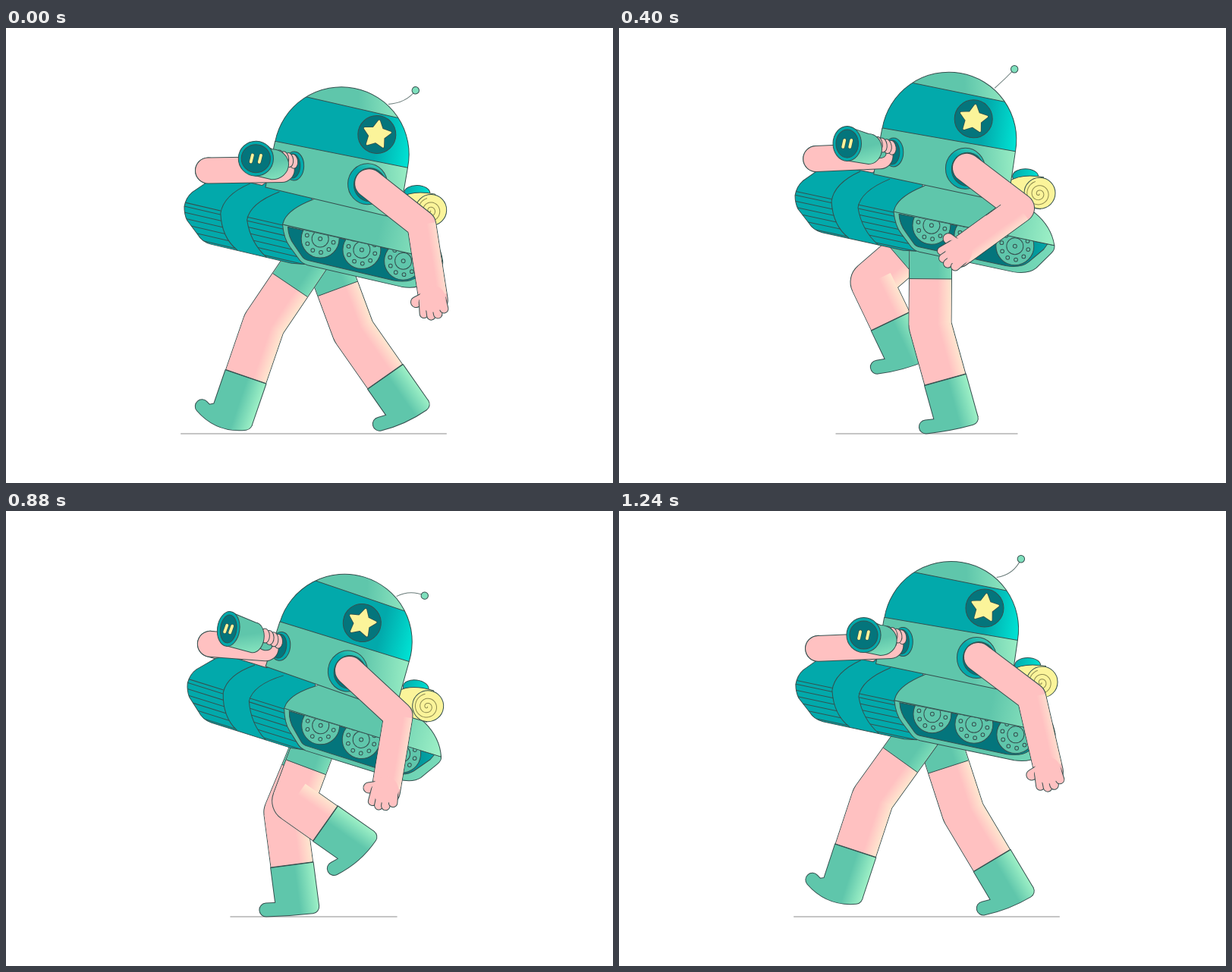
Recreate the animation shown at these times as an HTML page with a canvas. Size 800 px wide and 600 px high, loop 1280 ms.

```html
<!DOCTYPE html>
<html lang="en">
<head>
<meta charset="utf-8">
<title>Walking tank</title>
<style>
html, body { margin: 0; width: 100%; height: 100%; overflow: hidden; background: #fff; }
canvas { display: block; width: 800px; height: 600px; }
</style>
</head>
<body>
<canvas id="stage" width="800" height="600"></canvas>
<script>
const ctx = document.getElementById('stage').getContext('2d');
const LOOP = 1280, STEP = LOOP / 2, TICK = 40, FLOOR = 535;
const INK = '#35504f', PINK = '#ffc1c1', CREAM = '#ffe6cf', GREEN = '#5fc6ab', MINT = '#9df0c6',
  TEAL = '#02a9ab', CYAN = '#00e0d2', DEEP = '#04757c', YELLOW = '#fbf49a';

// Key poses of one leg: time, knee, boot top.
const POSES = [
  { t: 0, knee: [340, 390], top: [316, 460] },
  { t: 160, knee: [350, 399], top: [352, 467] },
  { t: 400, knee: [410, 392], top: [430, 464] },
  { t: 640, knee: [458, 400], top: [500, 460] },
  { t: 720, knee: [432, 413], top: [485, 452] },
  { t: 800, knee: [405, 408], top: [454, 431] },
  { t: 1040, knee: [333, 335], top: [358, 387] },
  { t: 1200, knee: [330, 366], top: [314, 433] }
];

const rad = deg => deg * Math.PI / 180;
const wave = (t, period, peak) => Math.cos(2 * Math.PI * (t - peak) / period);
const add = (p, d, k) => [p[0] + d[0] * k, p[1] + d[1] * k];
const mix = (a, b, k) => [a[0] + (b[0] - a[0]) * k, a[1] + (b[1] - a[1]) * k];
const aim = deg => [Math.cos(rad(deg)), Math.sin(rad(deg))];
const back = d => [d[1], -d[0]];
const unit = (a, b) => {
  const x = b[0] - a[0], y = b[1] - a[1], l = Math.hypot(x, y);
  return [x / l, y / l];
};

// How deep the body sinks within a step: 0 is upright, 1 is the lowest point.
const sink = t => .38 + .57 * wave(t, STEP, 132) + .14 * wave(t, STEP / 2, 120);

// Smooth periodic path through the key poses.
function pose(part, t) {
  t %= LOOP;
  const n = POSES.length;
  const at = i => {
    const p = POSES[(i + n) % n];
    return [p.t + Math.floor(i / n) * LOOP, p[part]];
  };
  let i = n - 1;
  while (POSES[i].t > t) i--;
  const [ta, a] = at(i - 1), [tb, b] = at(i), [tc, c] = at(i + 1), [td, d] = at(i + 2);
  const h = tc - tb, u = (t - tb) / h, v = 1 - u;
  return b.map((y, j) => {
    const m0 = (c[j] - a[j]) / (tc - ta) * h, m1 = (d[j] - y) / (td - tb) * h;
    return v * v * (1 + 2 * u) * y + u * v * v * m0 + u * u * (3 - 2 * u) * c[j] - u * u * v * m1;
  });
}

function paint(path, fill, line = INK, w = 1) {
  if (fill) { ctx.fillStyle = fill; ctx.fill(path); }
  if (line) { ctx.strokeStyle = line; ctx.lineWidth = w; ctx.stroke(path); }
}
const shape = (d, fill, line, w) => paint(new Path2D(d), fill, line, w);
function oval(x, y, rx, ry, fill, line, turn = 0) {
  const p = new Path2D();
  p.ellipse(x, y, rx, ry, turn, 0, 2 * Math.PI);
  paint(p, fill, line);
}
function trace(pts, w, color, cap = 'butt') {
  ctx.beginPath();
  pts.forEach(p => ctx.lineTo(...p));
  ctx.lineCap = cap;
  ctx.lineWidth = w;
  ctx.strokeStyle = color;
  ctx.stroke();
}
function blend(a, b, ...stops) {
  const g = ctx.createLinearGradient(...a, ...b);
  stops.forEach(([k, c]) => g.addColorStop(k, c));
  return g;
}
// Straight piece of a limb, lit along its back edge.
function lit(a, b, w, base, light) {
  const n = back(unit(a, b));
  trace([a, b], w, blend(add(a, n, -w / 2), add(a, n, w / 2), [.68, base], [1, light]));
}
function limb(pts, w, color) {
  trace(pts, w + 2, INK, 'round');
  trace(pts, w, color, 'round');
}
function placed(px, py, x, y, deg, draw) {
  ctx.save();
  ctx.translate(px + x, py + y);
  ctx.rotate(rad(deg));
  ctx.translate(-px, -py);
  draw();
  ctx.restore();
}

function boot(top, d, t) {
  const n = back(d);
  const front = add(top, n, -28), rear = add(top, n, 28);
  const low = add(rear, d, 58), heel = add(low, n, -8.5), ankle = add(front, d, 47);
  const toe = add(add(top, d, 51 + 8 * wave(t, LOOP, 200)), n, -42);
  toe[1] = Math.min(toe[1], FLOOR - 9);
  const s = unit(toe, heel);
  const bend = add(mix(toe, heel, .5), [-s[1], s[0]], d[0] < 0 ? -50 * d[0] : 10 * d[0]);
  const shaft = new Path2D(), sole = new Path2D();
  shaft.moveTo(...front);
  [rear, low, heel].forEach(p => shaft.lineTo(...p));
  shaft.quadraticCurveTo(...bend, ...toe);
  shaft.lineTo(...ankle);
  shaft.closePath();
  sole.moveTo(...heel);
  sole.quadraticCurveTo(...bend, ...toe);
  const tone = blend(front, rear, [.55, GREEN], [1, MINT]);
  ctx.lineCap = 'round';
  paint(shaft, null, INK, 2);
  paint(sole, null, INK, 19);
  paint(sole, null, tone, 17);
  paint(shaft, tone, null);
  trace([front, rear], 1, INK);
}

function leg(t, hipX, hipY) {
  const knee = pose('knee', t), top = pose('top', t), w = 55;
  const hip = [hipX + .1 * (knee[0] - 390), hipY];
  const hem = mix(knee, hip, .52), side = back(unit(knee, hip));
  trace([hip, knee, top], w + 2, INK);
  trace([hip, knee, top], w, PINK);
  lit(hem, knee, w, PINK, CREAM);
  lit(knee, top, w, PINK, CREAM);
  lit(hip, hem, w, GREEN, '#7bdcb8');
  trace([add(hem, side, -w / 2), add(hem, side, w / 2)], 1, INK);
  boot(top, unit(knee, top), t);
}

const FRONT = 'M232 222Q234 210 242 203L266 186Q276 182 290 183L334 192L345 184L400 200V210L392 295L375 294L268 271Q256 268 250 258L236 240Q232 232 232 222Z';
const TRACK = 'M369 246Q370 260 378 270L388 284Q391 289 398 290L510 314Q530 317 540 309L560 292L565 285Z';

function slats(region) {
  ctx.save();
  ctx.clip(new Path2D(FRONT));
  ctx.clip(new Path2D(region));
  trace([[225, 215], [400, 252]], 1, INK);
  for (let y = 220; y < 265; y += 8) trace([[225, y], [400, y + 37]], 1, INK);
  ctx.restore();
}
function wheel(x, y) {
  oval(x, y, 25, 25, GREEN);
  oval(x, y, 11, 11);
  oval(x, y, 2.5, 2.5);
  for (let a = 14; a < 374; a += 36) {
    const [px, py] = add([x, y], aim(a), 18);
    oval(px, py, 2.4, 2.4);
  }
}
function hull() {
  shape(FRONT, TEAL);
  slats('M200 200L280 225V230Q282 262 303 278L200 300Z');
  slats('M315 232V238Q320 268 342 287L396 300L362 241Z');
  shape('M318 190Q283 206 280 230Q282 262 303 278M357 200Q318 216 315 238Q320 268 342 287');
  shape('M362 243Q364 262 372 272L385 289Q389 294 396 296L520 322Q540 325 550 317L570 297Q575 292 574 287Z',
    blend([480, 290], [575, 310], [0, GREEN], [1, '#79dcba']));
  shape(TRACK, blend([510, 290], [566, 295], [0, DEEP], [1, TEAL]));
  ctx.save();
  ctx.clip(new Path2D(TRACK));
  for (let i = 0; i < 3; i++) wheel(412 + 55 * i, 261 + 13.5 * i);
  ctx.restore();
  shape('M400 210Q371 222 364 237L362 243L574 287Q570 262 548 244L513 222L420 200Z',
    blend([490, 248], [575, 265], [0, GREEN], [1, MINT]));
}

function roll() {
  oval(536, 196, 17, 10, blend([518, 190], [552, 196], [0, TEAL], [1, CYAN]));
  shape('M514 203Q530 192 560 197L556 239L510 232Z', YELLOW);
  oval(555, 218, 20.5, 20.5, YELLOW);
  ctx.beginPath();
  for (let a = 0; a < 17; a += .2) ctx.lineTo(...add([554, 219], [Math.cos(a), Math.sin(a)], a));
  ctx.strokeStyle = '#8d8a50';
  ctx.lineWidth = 1;
  ctx.stroke();
}

// The tip trails behind the bobbing body.
function antenna(t) {
  const x = 528 + 8 * wave(t, STEP, 130), y = 63 + 14 * wave(t, STEP, 175);
  const bx = 514 + 5 * wave(t, STEP, 40), by = 72 + 6 * wave(t, STEP, 20);
  shape(`M495 80Q${bx} ${by} ${x} ${y}`, null, '#687a78');
  oval(x, y, 4.7, 4.7, '#7fe0bd');
}

function star(x, y) {
  oval(x, y, 25, 25, DEEP);
  const p = new Path2D();
  for (let i = 0; i < 10; i++) p.lineTo(...add([x, y], aim(-82 + i * 36), i % 2 ? 9.5 : 18));
  p.closePath();
  paint(p, YELLOW, INK, 4);
  paint(p, YELLOW, YELLOW, 2.4);
}

function dome(turn) {
  const p = new Path2D();
  p.moveTo(336, 194);
  p.lineTo(347, 133);
  p.arc(435, 148, 89, rad(189.5), rad(9.5));
  p.lineTo(513, 231);
  p.closePath();
  paint(p, blend([458, 122], [525, 118], [0, GREEN], [1, MINT]), null);
  ctx.save();
  ctx.clip(p);
  shape('M330 62L540 104L540 166L330 130Z', blend([482, 120], [525, 126], [0, TEAL], [1, CYAN]));
  ctx.restore();
  star(463.5 + turn, 120.5);
  paint(p);
}

// Far forearm, its fingers and the gun it holds.
const FAR_ELBOW = [260, 174], FAR_WIDTH = 33;
function gun(turn) {
  const hand = .9 * turn;
  oval(359 + .8 * turn, 165, 13, 19, TEAL);
  oval(357 + .8 * turn, 165, 10, 16, DEEP);
  limb([FAR_ELBOW, [341 + hand, 170]], FAR_WIDTH, PINK);
  oval(340 + hand, 167, 9, 6, GREEN);
  for (let i = 3; i >= 0; i--) oval(338 + i * 6 + hand, 154 + i * 1.6, 6, 9.5, PINK, INK, -.15);

  const x = 295 + 1.57 * turn, y = 153 + .2 * turn, rx = 17.5 + .32 * turn, vx = 30 - .5 * turn, vy = 7;
  const body = new Path2D();
  body.moveTo(x, y - 22.5);
  body.lineTo(x + vx, y + vy - 20);
  body.ellipse(x + vx, y + vy, rx - 1, 20, 0, -Math.PI / 2, Math.PI / 2);
  body.lineTo(x, y + 22.5);
  body.closePath();
  paint(body, blend([x, y - 20], [x + 14, y + 32], [.55, GREEN], [1, '#85e3be']));
  oval(x, y, rx, 23, TEAL);
  oval(x, y, rx - 4, 18.5, DEEP);
  for (const k of [-1, 1]) {
    const c = x + k * rx * .24;
    const slit = [[c + 1, y - 4.5], [c - 1, y + 4.5]];
    trace(slit, 5, INK, 'round');
    trace(slit, 3.8, YELLOW, 'round');
  }
}

function nearArm(s, upper, fore) {
  const u = aim(upper), f = aim(fore), n = [-f[1], f[0]], w = 37;
  const elbow = add(s, u, 88), wrist = add(elbow, f, 95);
  limb([s, elbow, add(wrist, f, 6)], w, PINK);
  lit(elbow, wrist, w, PINK, '#ffdccd');
  if (fore - upper > 80) {
    const edge = add(elbow, n, w / 2);
    trace([add(edge, f, 18), add(edge, f, 42)], 1, INK);
  }
  const spot = (a, b) => add(add(wrist, f, a), n, b);
  limb([spot(0, 8), spot(5, 23)], 13, PINK);
  for (let b = 15; b > -14; b -= 9) limb([spot(6, b * .9), spot(26 - .03 * (b - 3) ** 2, b)], 10.5, PINK);
  oval(...spot(4, 1), 17.5, 17.5, PINK, null);
}

function draw(t) {
  const low = sink(t), late = sink(t - 40);
  const turn = 3 + 16 * wave(t, LOOP, 90);
  const dome0 = [435, 170], dx = 15 * low, dy = 43 * low, tilt = 9 * late;
  const inDome = f => placed(...dome0, dx, dy, tilt, f);
  ctx.clearRect(0, 0, 800, 600);
  ctx.lineJoin = 'round';
  const half = 140 + 36 * wave(t, STEP, 620);
  trace([[405.5 - half, FLOOR], [405.5 + half, FLOOR]], 1, '#8b8b8b');

  const hx = 5 * low, hy = 39 * low;
  leg(t + STEP, 409 + hx, 275 + hy);
  leg(t, 409 + hx, 275 + hy);
  inDome(() => limb([FAR_ELBOW, [345, 186]], FAR_WIDTH, PINK));
  placed(412, 260, hx, hy, 6.6 * late, hull);
  inDome(() => {
    roll();
    antenna(t);
    dome(turn);
    gun(turn);
    const x = 453 + turn;
    oval(x, 186, 26, 27, blend([x, 186], [x + 10, 160], [.4, TEAL], [1, '#3cc9b4']));
    oval(x + 3, 187, 21, 22, DEEP);
  });
  const pivot = add(dome0, [dx, dy], 1);
  const shoulder = add(add(pivot, aim(tilt), 20 + turn), aim(tilt + 90), 15);
  nearArm(shoulder, 37 + 7 * late, 110.5 + 38 * wave(t, LOOP, 500));
}

function tick() {
  draw(Math.floor(performance.now() / TICK) * TICK % LOOP);
  requestAnimationFrame(tick);
}
tick();
</script>
</body>
</html>
```
